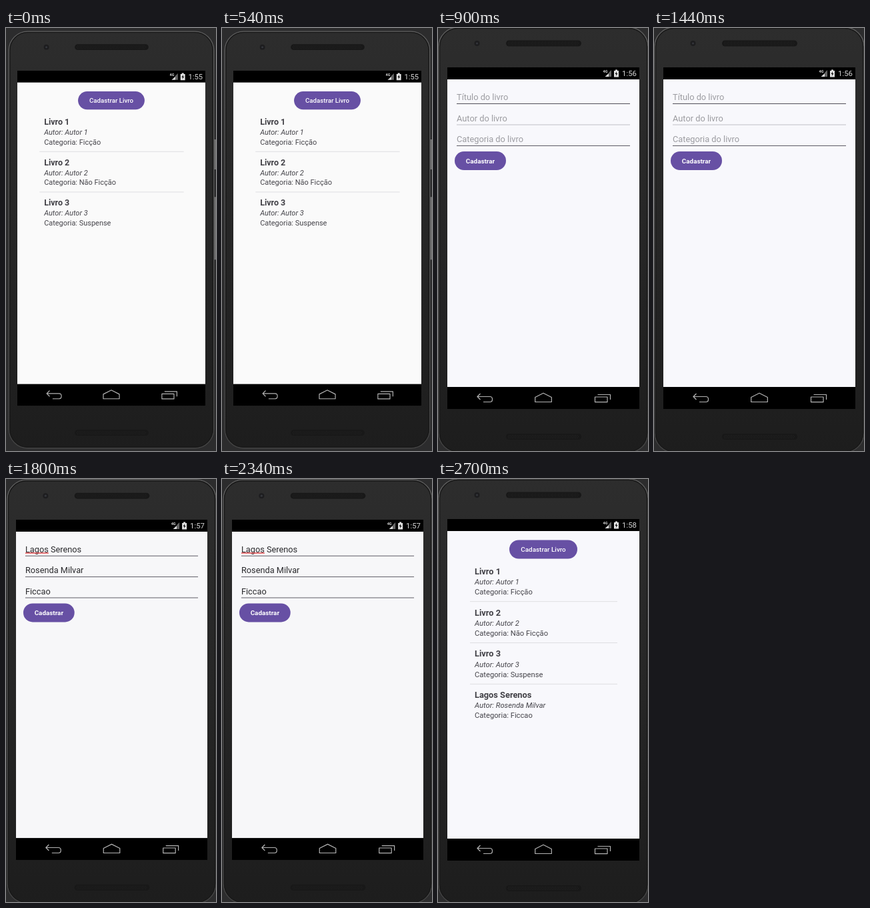
Write an HTML page that moves like this. It is 315 by 634 pixels and loops after 3.6 s.

```html
<!DOCTYPE html>
<html lang="pt-BR">
<head>
<meta charset="utf-8">
<title>Cadastro de livros</title>
<style>
html, body { margin: 0; width: 100%; height: 100%; overflow: hidden; background: #2c2c2d; }
svg { display: block; width: 315px; height: 634px; font-family: Roboto, sans-serif; }
.scene { visibility: hidden; animation: show 3600ms step-end infinite; }
@keyframes show {
  0% { visibility: visible; }
  25%, 100% { visibility: hidden; }
}
.title { font-size: 12.8px; font-weight: 700; fill: #414046; }
.line { font-size: 11.2px; fill: #45444a; }
.author { font-style: italic; }
.field { font-size: 12.8px; fill: #29292c; }
.hint { fill: #9c9ca1; }
.label { font-size: 9.9px; font-weight: 500; fill: #fff; text-anchor: middle; }
.strong { font-weight: 700; }
.clock { font-size: 11.4px; fill: #d4d4d4; }
.net { font-size: 5.5px; font-weight: 700; fill: #ddd; }
.nav { fill: none; stroke: #b4b4b4; stroke-width: 1.2; stroke-linejoin: round; }
</style>
</head>
<body>
<svg id="stage" viewBox="0 0 315 634">
  <defs>
    <linearGradient id="body" x2="0" y2="1">
      <stop offset="0" stop-color="#2d2d2d"/>
      <stop offset=".5" stop-color="#262626"/>
      <stop offset="1" stop-color="#1d1d1d"/>
    </linearGradient>
    <linearGradient id="rim" x2="0" y2="1">
      <stop offset="0" stop-color="#5e5e5e"/>
      <stop offset="1" stop-color="#444"/>
    </linearGradient>
    <g id="speaker">
      <rect width="113" height="9" rx="4.5" fill="#181818"/>
      <path d="M4 2.5H109M3 4.5H110M4 6.5H109" stroke="#262626" stroke-dasharray="1 1.5"/>
    </g>
    <!-- Phone drawn around a 288 x 512 screen at the origin -->
    <g id="phone">
      <path d="M303 105V151M303 193V289" stroke="#858585" stroke-width="2"/>
      <rect x="-13" y="-60" width="314" height="637" rx="29" fill="url(#body)" stroke="url(#rim)" stroke-width="1.4"/>
      <rect x="-11.5" y="-58.5" width="311" height="634" rx="27.5" fill="none" stroke="#191919" stroke-width="1.4"/>
      <circle cx="44.5" cy="-36" r="4" fill="#1d1d1f"/>
      <circle cx="44.5" cy="-36" r="1.6" fill="#34363b"/>
      <use href="#speaker" x="88" y="-40.5"/>
      <use href="#speaker" x="88" y="549"/>
      <rect width="288" height="512"/>
      <text class="net" x="233.5" y="8">4G</text>
      <path d="M246 4V14H242V8Z" fill="#666"/>
      <path d="M242 9V14H236.5Z" fill="#ddd"/>
      <path d="M250 5H252V3.5H255V5H257V14.5H250Z" fill="#e4e4e4"/>
      <path d="M254.3 6L251.6 10H253.3L252.8 13L255.5 9H253.8Z"/>
      <g class="nav">
        <path d="M49.5 489L45 493.5L49.5 498M45 493.5H64Q67.5 493.5 67.5 497.5T64 501.5H54"/>
        <path d="M131.7 494.5L144 488.3L156.3 494.5V501.5H131.7Z"/>
        <path d="M221.5 494H240V501.7H221.5ZM225.5 490.5H244.5V498"/>
      </g>
    </g>
  </defs>
</svg>
<script>
const text = (cls, x, y, str) =>
  `<text class="${cls}" x="${x}" y="${y}">${str}</text>`;

const rule = (x1, x2, y, color) =>
  `<path d="M${x1} ${y}H${x2}" stroke="${color}"/>`;

const button = (x, y, w, cls, label) =>
  `<rect x="${x}" y="${y}" width="${w}" height="28" rx="14" fill="#6750a4"/>` +
  text(cls, x + w / 2, y + 17.5, label);

const books = [
  ['Livro 1', 'Autor 1', 'Ficção'],
  ['Livro 2', 'Autor 2', 'Não Ficção'],
  ['Livro 3', 'Autor 3', 'Suspense'],
  ['Lagos Serenos', 'Rosenda Milvar', 'Ficcao']
];
const hints = ['Título do livro', 'Autor do livro', 'Categoria do livro'];

const list = items => button(93, 31.5, 102, 'label', 'Cadastrar Livro') +
  items.map(([title, author, kind], i) => {
    const y = 82.8 + 61.8 * i;
    return (i ? rule(34, 255, y - 20.9, '#dedee2') : '') +
      text('title', 41, y, title) +
      text('line author', 41, y + 15.2, 'Autor: ' + author) +
      text('line', 41, y + 30.2, 'Categoria: ' + kind);
  }).join('');

const form = (values, cls, colors) =>
  values.map((v, i) =>
    text(cls, 14, 49 + 31.5 * i, v) +
    rule(14, 274, 54.5 + 31.5 * i, colors[i])).join('') +
  button(11, 126, 77, 'label strong', 'Cadastrar');

const typo = '<path d="M14 50.2H49" stroke="#e0484c" stroke-width="1.5"/>';

// Each scene: phone placement, clock, screen colour, screen content
const scenes = [
  ['.979 0 0 .9805 17 64', '1:55', '#fafafa', list(books.slice(0, 3))],
  ['1 0 0 1 14 59', '1:56', '#f8f8fc',
    form(hints, 'field hint', ['#504e58', '#c0c0c5', '#5c5a64'])],
  ['.9965 0 0 .996 15 61', '1:57', '#f7f7f9',
    form(books[3], 'field', ['#5e5c66', '#5e5c66', '#5e5c66']) + typo],
  ['1 0 0 1 14 60', '1:58', '#f8f8fc', list(books)]
];

document.getElementById('stage').insertAdjacentHTML('beforeend',
  scenes.map(([matrix, time, color, content], i) =>
    `<g class="scene" style="animation-delay:${(i - scenes.length) * 900}ms" transform="matrix(${matrix})">
      <use href="#phone"/>
      <rect y="18" width="288" height="461" fill="${color}"/>
      ${text('clock', 262, 13.2, time)}${content}
    </g>`).join(''));
</script>
</body>
</html>
```
